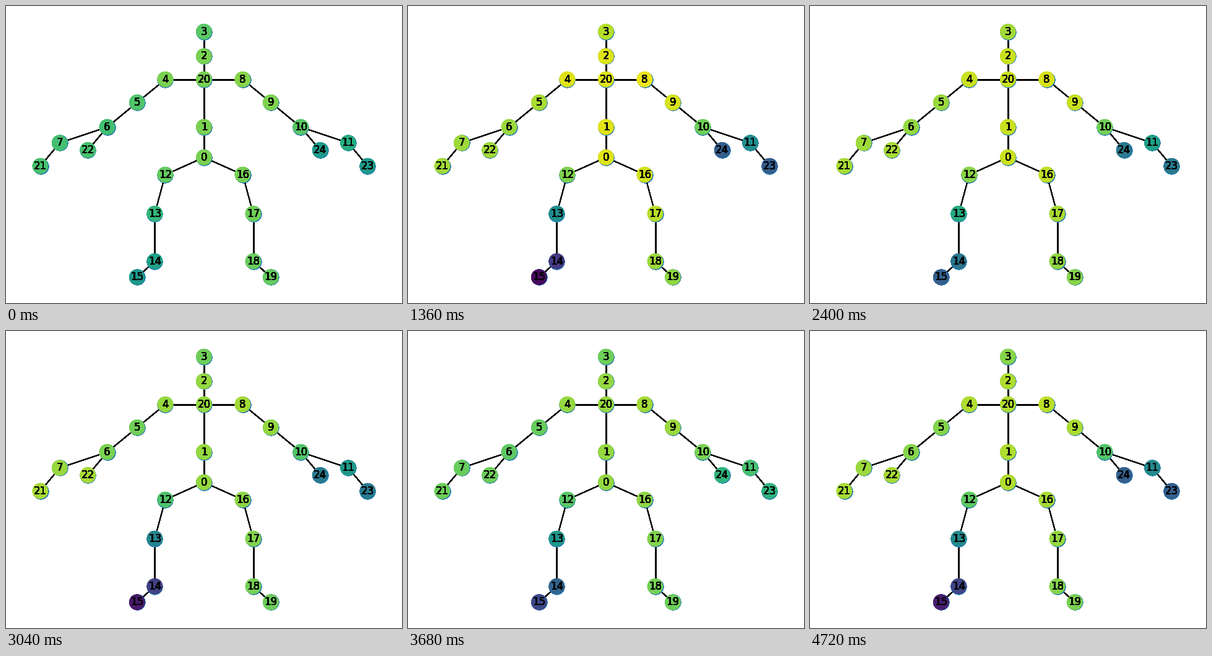
Recreate the animation shown at these times as a matplotlib script. Size 640 by 480 pixels, loop 4800 ms.

```python
import numpy as np
import matplotlib.pyplot as plt
from matplotlib.animation import FuncAnimation
from matplotlib.collections import LineCollection

W, H, DPI = 640, 480, 100
FRAMES, INTERVAL = 60, 80
PASSES = 12  # stacked drawing hardens the soft edges

# Grid places: x from the middle, y from the top; the right side is mirrored.
SPINE = {3: (0, 0), 2: (0, 17), 20: (0, 33), 1: (0, 66), 0: (0, 87)}
LEFT = {4: (-22, 33), 5: (-38, 49), 6: (-55, 66), 7: (-82, 77),
        21: (-93, 93), 22: (-66, 82),
        12: (-22, 99), 13: (-28, 126), 14: (-28, 159), 15: (-38, 170)}
MIRROR = {4: 8, 5: 9, 6: 10, 7: 11, 21: 23, 22: 24,
          12: 16, 13: 17, 14: 18, 15: 19}

LEFT_ARM, RIGHT_ARM = (4, 5, 6, 7, 21), (8, 9, 10, 11, 23)
LEFT_LEG, RIGHT_LEG = (0, 12, 13, 14, 15), (0, 16, 17, 18, 19)
CHAINS = [(3, 2, 20, 1, 0), (20, *LEFT_ARM), (20, *RIGHT_ARM),
          (6, 22), (10, 24), LEFT_LEG, RIGHT_LEG]

# Activity of the trunk and of the limb tips at a few key steps.
KEYS = [0, 8, 17, 30, 38, 46, 59]
TRUNK = [.80, .88, .95, .92, .84, .84, .88]
LEFT_HAND = [.71, .86, .86, .87, .87, .78, .87]
RIGHT_HAND = [.54, .40, .30, .41, .41, .65, .30]
LEFT_FOOT = [.53, .03, .03, .30, .07, .22, .08]


def spread(root, tip, bend=1.0, dip=0.0):
    """Levels of the five joints of a limb, easing from root to tip."""
    t = np.linspace(0, 1, 5)
    s = t ** bend
    ease = s * s * (3 - 2 * s)
    return root + (tip - root) * ease - dip * t * (1 - t) ** 2


def colours(step):
    trunk, l_hand, r_hand, l_foot = (
        np.interp(step, KEYS, curve)
        for curve in (TRUNK, LEFT_HAND, RIGHT_HAND, LEFT_FOOT))
    level = np.full(25, trunk)
    level[3] -= .06
    level[list(LEFT_ARM)] = spread(trunk, l_hand, dip=.45)
    level[list(RIGHT_ARM)] = spread(trunk + .02, r_hand, bend=1.5)
    level[list(LEFT_LEG)] = spread(trunk, l_foot)
    level[list(RIGHT_LEG)] = spread(trunk, .36 + trunk / 2)
    level[22], level[24] = level[21], level[23]
    return plt.cm.viridis(level)


pos = {**SPINE, **LEFT}
pos.update({MIRROR[j]: (-x, y) for j, (x, y) in LEFT.items()})
points = np.array([pos[j] for j in range(25)])

fig = plt.figure(figsize=(W / DPI, H / DPI), dpi=DPI, facecolor="white")
ax = fig.add_axes((0, 0, 1, 1))
ax.axis("off")

bones = [(pos[a], pos[b]) for c in CHAINS for a, b in zip(c, c[1:])]
ax.add_collection(LineCollection(bones * PASSES * 4, colors="black",
                                 linewidths=1, zorder=1))

# Single-colour markers snap to pixels, which leaves a thin rim below right.
nodes = []
for _ in range(PASSES):
    ax.scatter(*points.T, s=300, c="#1f78b4", zorder=2)
    nodes.append(ax.scatter(*points.T, s=300, c=colours(0), zorder=2))
    for j, (x, y) in enumerate(points):
        ax.text(x, y, str(j), size=12, family="DejaVu Sans",
                ha="center", va="center", zorder=3)

# A five percent margin, applied twice.
pad = 1.1 ** 2
ax.set(xlim=(-93 * pad, 93 * pad), ylim=(85 + 85 * pad, 85 - 85 * pad))


def update(step):
    shades = colours(step)
    for layer in nodes:
        layer.set_facecolor(shades)
    return nodes


anim = FuncAnimation(fig, update, frames=FRAMES, interval=INTERVAL,
                     repeat=True, repeat_delay=0)
plt.show()
```
